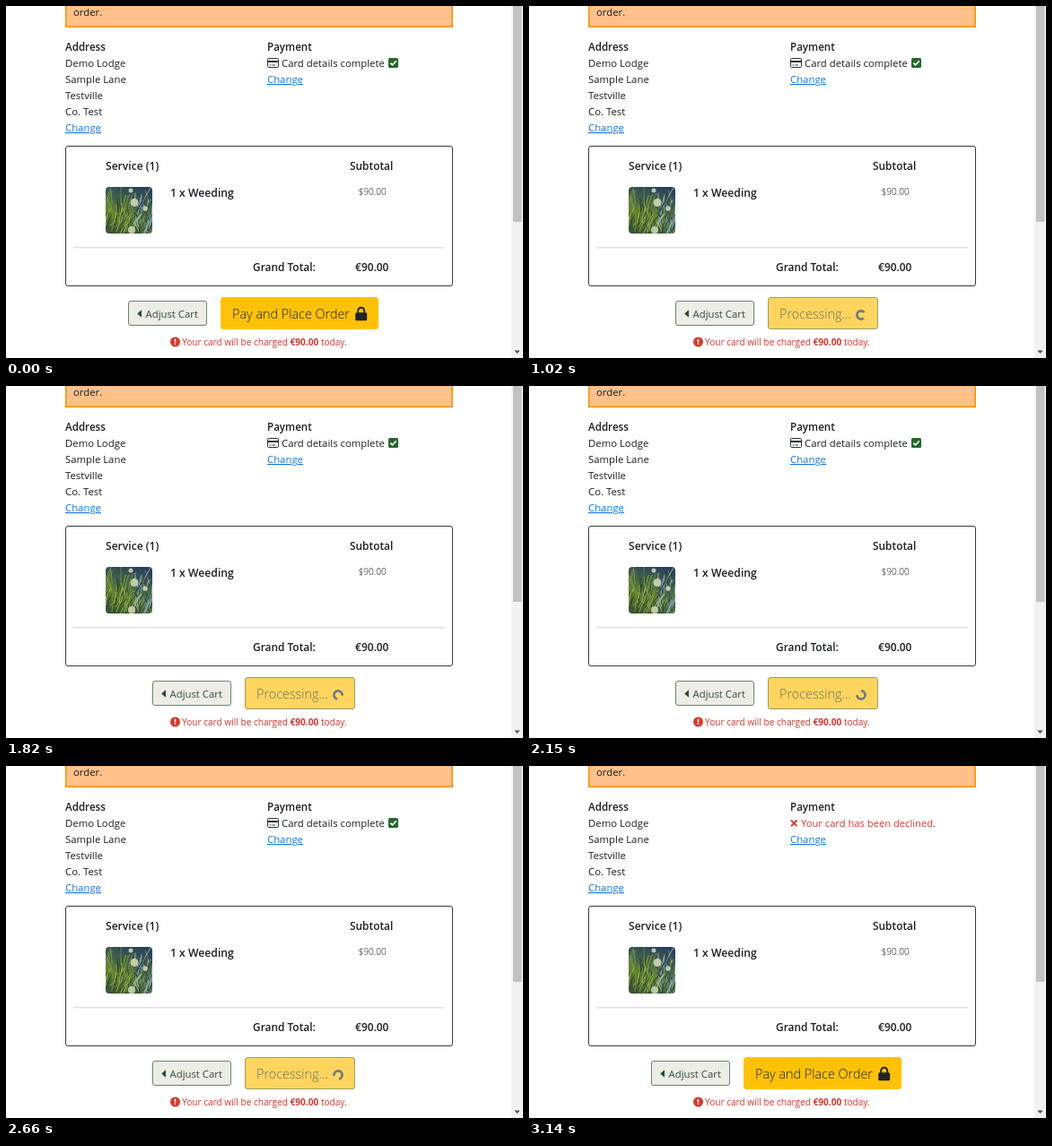
Animation of 576x393 px, one loop 5.31 s. Source, as an HTML page:

```html
<!DOCTYPE html>
<html lang="en">
<head>
<meta charset="utf-8">
<title>Checkout</title>
<style>
  html, body { margin: 0; width: 100%; height: 100%; overflow: hidden; background: #fff; }
  svg { display: block; width: 576px; height: 393px; }
  text { font: 11.35px "Open Sans", "Noto Sans", sans-serif; fill: #1b1f23; white-space: pre; }
  .b { font-weight: 600; font-size: 11.9px; }
  .link { fill: #1479e0; text-decoration: underline; }
  .red { fill: #d63a2f; }
  .small { font-size: 10.1px; }
  .small tspan { font-weight: 700; }
  .big { font-size: 14.4px; font-weight: 300; }
</style>
</head>
<body>
<svg viewBox="0 0 576 393">
  <defs>
    <linearGradient id="meadow" x1="0.7" y1="0" x2="0.4" y2="1">
      <stop offset="0" stop-color="#28405e"/>
      <stop offset=".35" stop-color="#42604a"/>
      <stop offset=".65" stop-color="#648430"/>
      <stop offset="1" stop-color="#3a5535"/>
    </linearGradient>
    <clipPath id="thumb"><rect x="111" y="202" width="52" height="52" rx="4"/></clipPath>
  </defs>

  <rect x="66.8" y="-10" width="430.4" height="33.2" fill="#ffc08a" stroke="#f5970f" stroke-width="1.6"/>
  <text x="75" y="11">order.</text>

  <text class="b" x="66" y="50" style="font-size:11.6px">Address</text>
  <text x="66" y="68">Demo Lodge</text>
  <text x="66" y="86">Sample Lane</text>
  <text x="66" y="104">Testville</text>
  <text x="66" y="122">Co. Test</text>
  <text class="link" x="66" y="140">Change</text>

  <text class="b" x="291" y="50" style="font-size:11.6px">Payment</text>
  <g id="complete">
    <rect x="291.5" y="58.5" width="12" height="10" rx="1.2" fill="#fff" stroke="#27352f"/>
    <path d="M291 62H304" stroke="#27352f" stroke-width="2"/>
    <path d="M293.5 66H295.5M296.5 66H300" stroke="#27352f"/>
    <text x="307" y="68">Card details complete</text>
    <rect x="426" y="58" width="11" height="11" rx="1.5" fill="#24682b"/>
    <path d="M428.3 63.6l2.2 2.2 4.3-4.4" fill="none" stroke="#fff" stroke-width="1.6"/>
  </g>
  <g id="declined">
    <path d="M292 60.5l6.6 6.6m0-6.6l-6.6 6.6" stroke="#d63a2f" stroke-width="1.9"/>
    <text class="red" x="303" y="68" style="font-size:11.2px">Your card has been declined.</text>
  </g>
  <text class="link" x="291" y="86">Change</text>

  <rect x="66.5" y="156.5" width="431" height="156" rx="2.5" fill="#fff" stroke="#343a40"/>
  <text class="b" x="111" y="183" style="font-size:12.1px">Service (1)</text>
  <text class="b" x="383" y="183">Subtotal</text>
  <g clip-path="url(#thumb)">
    <rect x="111" y="202" width="52" height="52" fill="url(#meadow)"/>
    <g id="grass" fill="none"></g>
    <g fill="#d5dcb9" fill-opacity=".85">
      <circle cx="143" cy="219.5" r="4.5"/>
      <circle cx="155" cy="226" r="2.7"/>
      <circle cx="140" cy="250" r="4"/>
      <circle cx="139" cy="206" r="2.5"/>
    </g>
  </g>
  <text class="b" x="183" y="213" style="font-size:12.2px">1 x Weeding</text>
  <text x="392.5" y="211" style="font-size:10.1px;font-weight:300">$90.00</text>
  <rect x="75" y="269" width="414" height="1.5" fill="#dfe2e5"/>
  <text class="b" x="275" y="296">Grand Total:</text>
  <text class="b" x="389" y="296">€90.00</text>

  <g id="adjust">
    <rect x="136.5" y="329.5" width="87" height="27" rx="2.5" fill="#ecede6" stroke="#6c8270"/>
    <path d="M151 339.2v8.6l-4.8-4.3z" fill="#244d32"/>
    <text x="155.5" y="348" style="fill:#344b3b">Adjust Cart</text>
  </g>
  <g id="pay">
    <rect x="239" y="325" width="176" height="36" rx="3.5" fill="#ffc107"/>
    <text class="big" x="252" y="349">Pay and Place Order</text>
    <path d="M392.2 343v-2.7a3.5 3.5 0 0 1 7 0V343" fill="none" stroke="#212529" stroke-width="2"/>
    <rect x="389.2" y="342.3" width="13" height="9" rx="1.5" fill="#212529"/>
  </g>
  <g id="processing">
    <rect x="266.5" y="325.5" width="122" height="35" rx="2.5" fill="#ffd55f" stroke="#9b9e68"/>
    <text class="big" x="279" y="349" style="fill:#656c60">Processing...</text>
    <path id="spinner" d="M3.25 3.25A4.6 4.6 0 1 1 3.25 -3.25" fill="none" stroke="#707d80" stroke-width="2.7"/>
  </g>

  <circle cx="188.5" cy="375" r="5.5" fill="#d63a2f"/>
  <path d="M188.5 371.8v3.7m0 1v1.5" stroke="#fff" stroke-width="1.5"/>
  <text class="red small" x="196" y="379">Your card will be charged <tspan>€90.00</tspan> today.</text>

  <rect x="563" width="13" height="393" fill="#f1f1f1"/>
  <rect x="565" width="9.5" height="241" fill="#c1c1c1"/>
  <path d="M566.3 384.5h6.4l-3.2 3.5z" fill="#505050"/>

  <path id="hand" d="M4 14V2.2a2 2 0 0 1 4 0V9a1.7 1.7 0 0 1 3.2.5 1.7 1.7 0 0 1 3 .8 1.6 1.6 0 0 1 2.8 1.2v5.2c0 2-1 3.2-1.5 4.6V24H6.5v-2.3C4.5 19.5 2.5 16.5.6 14.2c-1.5-2 1-3.8 2.4-1.6z"
    fill="#fff" stroke="#111" stroke-width="1.1" stroke-linejoin="round"/>
</svg>
<script>
const LOOP = 5310, ENTER = 300, ARRIVE = 620, SUBMIT = 920, DECLINE = 3110;
const SPIN_PERIOD = 705, SPIN_START = -45;
const el = id => document.getElementById(id);
const show = (id, on) => el(id).style.display = on ? "" : "none";

function growGrass() {
  let seed = 7;
  const random = () => (seed = seed * 16807 % 2147483647) / 2147483647;
  const leftShades = ["#a3b83a", "#6f9137", "#1f3a48", "#86a04a", "#273f27"];
  const rightShades = ["#9fb2c4", "#7d98a0", "#213c66", "#b2bd8a", "#2f4a3a"];
  for (let i = 0; i < 120; i++) {
    const blade = document.createElementNS("http://www.w3.org/2000/svg", "path");
    const x = 109 + random() * 54, y = 218 + random() * 40;
    const lean = random() * 16 - 6, height = 6 + random() * 16;
    const shades = x < 138 ? leftShades : rightShades;
    blade.setAttribute("d", `M${x} ${y}q${lean / 4} ${-height / 2} ${lean} ${-height}`);
    blade.setAttribute("stroke", shades[i % shades.length]);
    blade.setAttribute("stroke-width", 0.5 + random() * 0.6);
    el("grass").append(blade);
  }
}

function draw(t) {
  const busy = t >= SUBMIT && t < DECLINE;
  show("complete", t < DECLINE);
  show("declined", t >= DECLINE);
  show("pay", !busy);
  show("processing", busy);
  el("adjust").setAttribute("transform", `translate(${busy ? 27 : 0} 0)`);
  const angle = SPIN_START + (t - SUBMIT) / SPIN_PERIOD * 360;
  el("spinner").setAttribute("transform", `translate(370 345) rotate(${angle})`);

  // The pointer rises from the bottom edge and eases onto the button.
  const left = 1 - Math.min(1, Math.max(0, (t - ENTER) / (ARRIVE - ENTER)));
  show("hand", t >= ENTER && t < SUBMIT);
  el("hand").setAttribute("transform", `translate(${379 + 18 * left ** 2} ${341.5 + 52 * left ** 2})`);
}

function tick() {
  draw(performance.now() % LOOP);
  requestAnimationFrame(tick);
}

growGrass();
tick();
</script>
</body>
</html>
```
